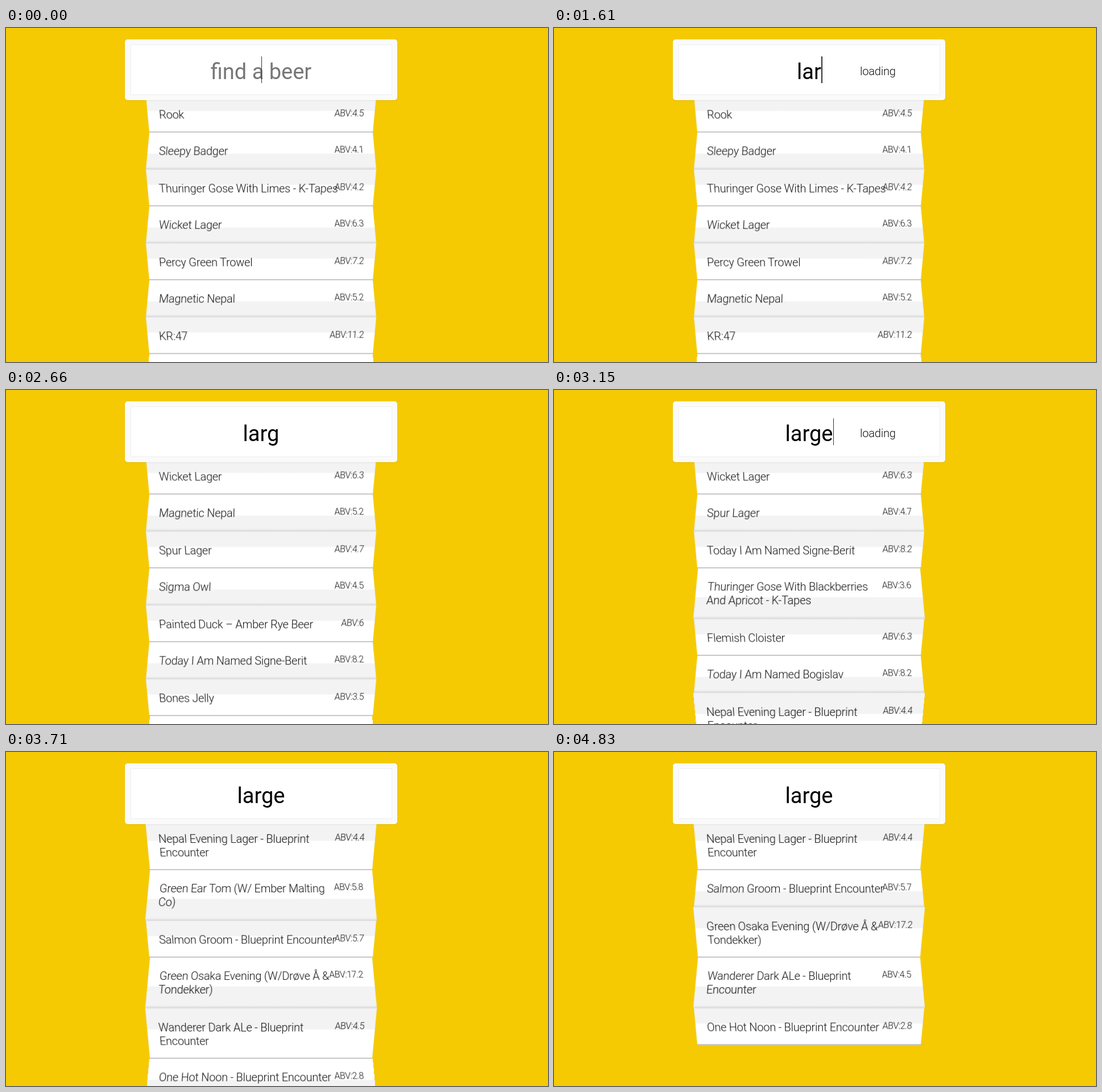
An HTML page for the animation above (4900 ms loop, 953x588 px).

```html
<!DOCTYPE html>
<html lang="en">
<head>
<meta charset="utf-8">
<title>Beer search</title>
<style>
  html, body { margin: 0; width: 100%; height: 100%; overflow: hidden; background: #f5ca03; }
  body { position: relative; font: 300 20px/24px Roboto, "Liberation Sans", sans-serif; color: #111; }

  .search {
    position: absolute; left: 209px; top: 20px; width: 479px; height: 107px;
    border-radius: 5px; background: #fafafa; box-shadow: 0 1px 3px #0001;
  }
  .field {
    position: absolute; inset: 9px 9px 9px 10px; box-sizing: border-box;
    border: 1px solid #eee; background: #fff;
  }
  .query {
    position: absolute; left: 0; top: 33.5px; width: 479px;
    font-size: 38px; line-height: 47px; font-weight: 400; text-align: center; color: #000;
  }
  .query span { position: relative; white-space: pre; }
  .query.empty { color: #777; }
  .caret {
    position: absolute; top: 30px; width: 1.5px; height: 47px; background: #333;
  }
  .loading { position: absolute; left: 329px; top: 44px; letter-spacing: -.2px; }

  .list { position: absolute; left: 249px; top: 119px; width: 399px; visibility: hidden; }
  .list.on { visibility: visible; }
  .row {
    position: relative; box-sizing: border-box; height: var(--h); padding: 20.5px 0 0 20px;
    letter-spacing: -.26px; white-space: nowrap; box-shadow: inset 0 0 3px #0001;
    --shift: calc(var(--h) * var(--h-ratio));
  }
  .row:nth-child(odd) {
    background:
      linear-gradient(transparent calc(100% - 1.5px), #ccc 0),
      linear-gradient(#f3f3f3 40%, #fff 42%);
    transform: translateY(var(--shift)) perspective(400px) rotateX(-10.7deg) scaleY(1.017);
  }
  .row:nth-child(even) {
    background:
      linear-gradient(transparent calc(100% - 5px), #dcdcdc),
      linear-gradient(#fff 57%, #f3f3f3 59%);
    transform: translateY(calc(-1 * var(--shift))) perspective(400px) rotateX(10.7deg) scaleY(1.017);
  }
  .abv { position: absolute; right: 19px; top: 18.5px; font-size: 16px; letter-spacing: -.4px; }
</style>
</head>
<body>
<div id="lists"></div>
<div class="search">
  <div class="field"></div>
  <div class="query"><span></span></div>
  <div class="caret"></div>
  <div class="loading">loading</div>
</div>
<script>
  const LOOP = 4900;

  // "|" marks a line break
  const beers = {
    rook: ['Rook', 4.5],
    badger: ['Sleepy Badger', 4.1],
    limes: ['Thuringer Gose With Limes - K-Tapes', 4.2],
    wicket: ['Wicket Lager', 6.3],
    trowel: ['Percy Green Trowel', 7.2],
    nepal: ['Magnetic Nepal', 5.2],
    kr: ['KR:47', 11.2],
    spur: ['Spur Lager', 4.7],
    cobble: ['Cobbling Q', 7.5],
    owl: ['Sigma Owl', 4.5],
    duck: ['Painted Duck – Amber Rye Beer', 6],
    signe: ['Today I Am Named Signe-Berit', 8.2],
    bones: ['Bones Jelly', 3.5],
    berries: ['Thuringer Gose With Blackberries|And Apricot - K-Tapes', 3.6],
    cloister: ['Flemish Cloister', 6.3],
    bogi: ['Today I Am Named Bogislav', 8.2],
    evening: ['Nepal Evening Lager - Blueprint|Encounter', 4.4],
    tom: ['Green Ear Tom (W/ Ember Malting|Co)', 5.8],
    salmon: ['Salmon Groom - Blueprint Encounter', 5.7],
    osaka: ['Green Osaka Evening (W/Drøve Å &|Tondekker)', 17.2],
    wander: ['Wanderer Dark ALe - Blueprint|Encounter', 4.5],
    noon: ['One Hot Noon - Blueprint Encounter', 2.8]
  };

  const results = [
    'rook badger limes wicket trowel nepal kr spur',
    'badger limes wicket nepal spur cobble owl duck',
    'wicket nepal spur owl duck signe bones berries',
    'wicket spur signe berries cloister bogi evening',
    'evening tom salmon osaka wander noon',
    'evening salmon osaka wander noon'
  ];

  // [start in ms, value]
  const queryAt = [[0, ''], [560, 'l'], [1120, 'la'], [1540, 'lar'], [2030, 'larg'], [2940, 'large']];
  const listAt = [[0, 0], [1680, 1], [2240, 2], [2730, 3], [3640, 4], [3850, 5]];
  const loadingAt = [[0, 0], [560, 1], [1680, 0], [2030, 1], [2240, 0], [2940, 1], [3640, 0]];
  const caretAt = [[0, 1], [70, 0], [560, 1], [2520, 0], [2940, 1], [3500, 0], [4130, 1], [4690, 0]];

  const pick = (track, t) => track.filter(([start]) => start <= t).pop()[1];
  const $ = s => document.querySelector(s);
  const add = (parent, cls, text = '') => {
    const el = document.createElement('div');
    el.className = cls;
    el.textContent = text;
    parent.append(el);
    return el;
  };

  const lists = results.map(keys => {
    const list = add($('#lists'), 'list');
    for (const key of keys.split(' ')) {
      const [name, abv] = beers[key];
      const lines = name.split('|');
      const h = 41 + 24 * lines.length;
      const row = add(list, 'row');
      row.style.setProperty('--h', h + 'px');
      row.style.setProperty('--h-ratio', h / 8700);
      lines.forEach(line => add(row, 'line', line));
      add(row, 'abv', 'ABV:' + abv);
    }
    return list;
  });

  const query = $('.query'), label = $('.query span'), caret = $('.caret'), loading = $('.loading');
  let shown;

  function draw() {
    const t = performance.now() % LOOP;
    const text = pick(queryAt, t);
    if (text !== shown) {
      shown = text;
      label.textContent = text || 'find a beer';
      query.classList.toggle('empty', !text);
    }
    const half = text ? label.offsetWidth / 2 : 0;
    caret.style.left = 239.5 + half + 'px';
    caret.style.visibility = pick(caretAt, t) ? 'visible' : 'hidden';
    loading.style.visibility = pick(loadingAt, t) ? 'visible' : 'hidden';
    const current = pick(listAt, t);
    lists.forEach((list, i) => list.classList.toggle('on', i === current));
    requestAnimationFrame(draw);
  }
  draw();
</script>
</body>
</html>
```
